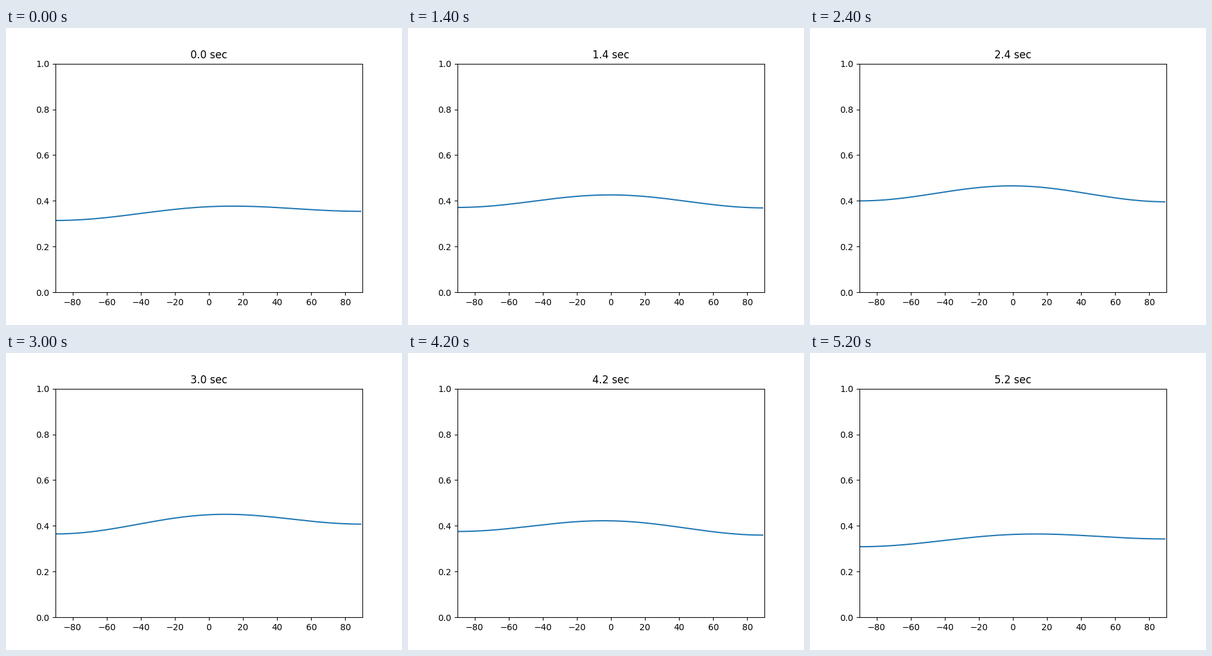
Recreate the animation shown at these times as a matplotlib script. Size 640x480 px, loop 5.4 s.

```python
import numpy as np
import matplotlib.pyplot as plt
from matplotlib.animation import FuncAnimation

STEP = 0.2
FRAMES = 27

# Key points: level straight ahead and lean towards the right
TIMES = [0.0, 0.8, 1.4, 2.4, 3.4, 4.2, 5.2]
LEVEL = [0.3745, 0.4285, 0.426, 0.4655, 0.4375, 0.422, 0.3625]
LEAN = [0.020, 0.008, -0.001, -0.002, 0.037, -0.008, 0.017]

angles = np.arange(-90, 90)
u = np.sin(np.radians(angles))


def response(t):
    """Parabola in the sine of the angle; a higher level bends more."""
    level = np.interp(t, TIMES, LEVEL)
    lean = np.interp(t, TIMES, LEAN)
    bend = 0.3 * level - 0.072
    return level + lean * u - bend * u**2


fig, ax = plt.subplots(figsize=(6.4, 4.8), dpi=100)
ax.set_xlim(-90, 90)
ax.set_ylim(0, 1)
line, = ax.plot(angles, response(0))
title = ax.set_title("0.0 sec")


def update(i):
    t = i * STEP
    line.set_ydata(response(t))
    title.set_text(f"{t:.1f} sec")
    return line, title


anim = FuncAnimation(fig, update, frames=FRAMES, interval=1000 * STEP,
                     repeat=True, repeat_delay=0, blit=False)
plt.show()
```
